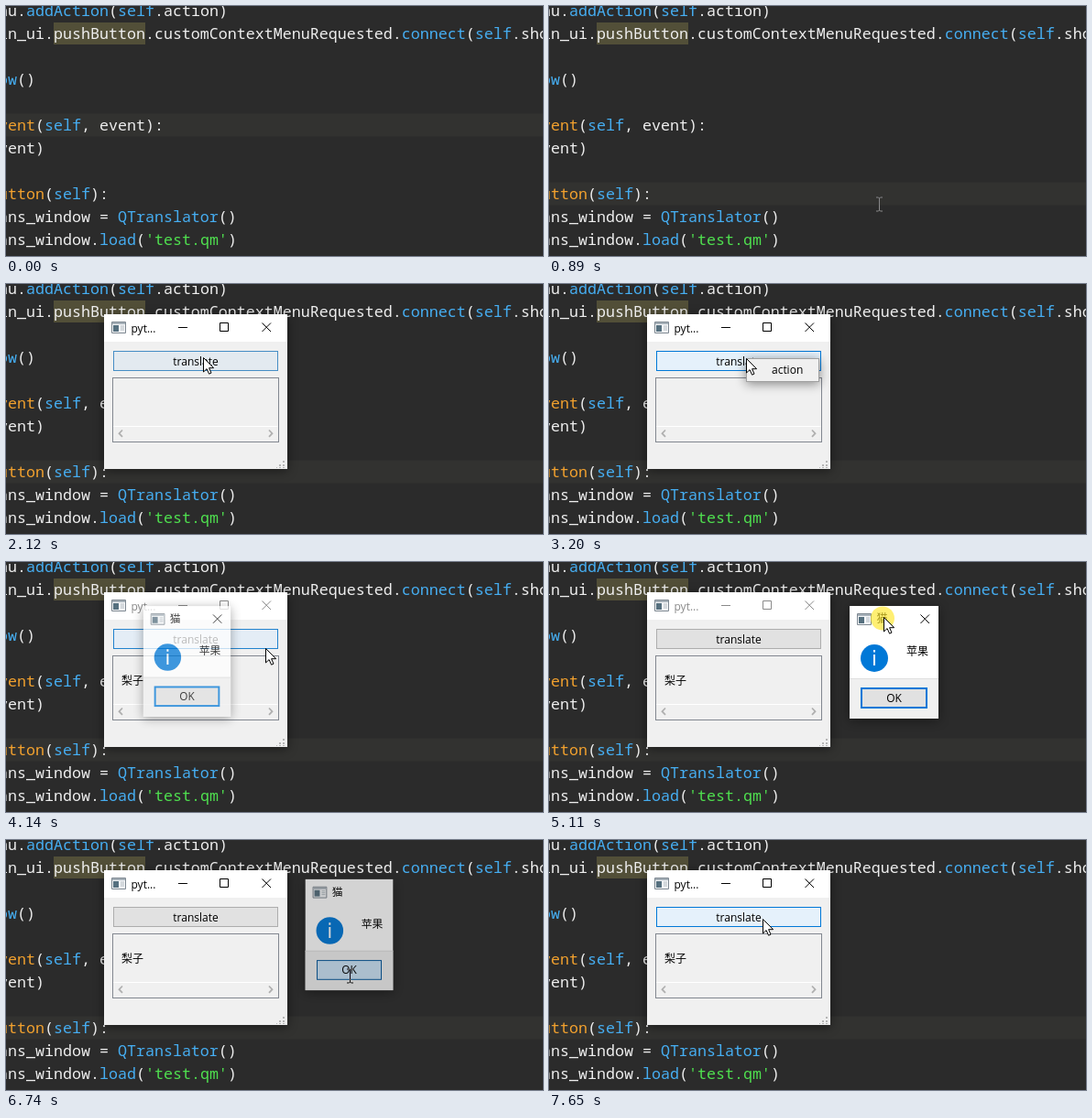
An HTML page for the animation above (8 s loop, 586 by 273 pixels).

```html
<!DOCTYPE html>
<html lang="en">
<head>
<meta charset="utf-8">
<style>
  html, body { margin: 0; width: 100%; height: 100%; overflow: hidden; background: #2b2b2b; }
  svg { display: block; width: 586px; height: 273px; }
  text { font: 12px "Open Sans", "Noto Sans CJK SC", "Noto Sans CJK", sans-serif; }
  #code text { font: 16.667px "Noto Sans Mono", monospace; white-space: pre; fill: #eee; }
  #code .b { fill: #46aef2; }
  #code .o { fill: #f2a12e; }
  #code .g { fill: #4fe04f; }
  .frame { filter: drop-shadow(0 2px 6px rgba(0, 0, 0, .45)); }
  .line { fill: none; stroke: currentColor; }
  #win, #dlg { transform-box: fill-box; transform-origin: center; }
</style>
</head>
<body>
<svg viewBox="0 0 586 273">
  <defs>
    <g id="icon">
      <path d="M.5.5h15v12H.5z" fill="#f4f6f8" stroke="#7d8790"/>
      <path d="M1 1h14v2H1z" fill="#a8b2ba"/>
      <path d="M2 4h6v7H2z" fill="#56707f"/>
      <path d="M10 5h4M10 7h4M10 9h4" stroke="#b4bcc2"/>
    </g>
  </defs>

  <rect id="band" width="586" height="25" fill="#323230"/>
  <rect x="52" y="18" width="100" height="24" fill="#524f38"/>
  <g id="code"></g>
  <path id="caret" d="M112 194v22" stroke="#ddd" stroke-width="2"/>

  <g id="win">
    <rect class="frame" x="107" y="33" width="200" height="169" fill="#f0f0f0"/>
    <path d="M107 33h200v30H107z" fill="#fff"/>
    <use href="#icon" x="115" y="41"/>
    <g id="bar">
      <text x="136.500" y="52.500" fill="currentColor">pyt...</text>
      <path class="line" d="M188 47.500h10M233.500 42.500h9v9h-9zM279.500 42.500l9.500 9.500m0-9.500l-9.500 9.500"/>
    </g>
    <rect x="117.500" y="73.500" width="179" height="21" fill="#e1e1e1" stroke="#adadad"/>
    <rect id="hover" x="117.500" y="73.500" width="179" height="21" fill="#e5f1fb" stroke="#0078d7"/>
    <text x="207" y="89" text-anchor="middle">translate</text>
    <rect x="116.500" y="102.500" width="181" height="70" fill="none" stroke="#828790"/>
    <path d="M117 155.500h180" stroke="#fff"/>
    <path d="M127 159.500l-3.500 3.700 3.500 3.700M287 159.500l3.500 3.700-3.500 3.700" fill="none" stroke="#b0b0b0" stroke-width="1.800"/>
    <text id="label" x="126" y="134">梨子</text>
    <path d="M302 193h2v2h-2zm0 4h2v2h-2zm-4 0h2v2h-2zm0 0M302 200h2v1h-2zm-4 0h2v1h-2zm-3 0h1v1h-1z" fill="#b5b5b5"/>
  </g>

  <g id="menu">
    <rect class="frame" x="215.500" y="81.500" width="79" height="25" fill="#f0f0f0" stroke="#a0a0a0"/>
    <rect id="item" x="218" y="84" width="74" height="20" fill="#91c9f7"/>
    <text x="243" y="98">action</text>
  </g>

  <g id="place">
    <g id="dlg">
      <rect class="frame" width="97" height="123" fill="#fff"/>
      <path d="M0 79h97v44H0z" fill="#f0f0f0"/>
      <path d="M0 79.500h97" stroke="#dfdfdf"/>
      <use href="#icon" x="8" y="8"/>
      <text x="29.500" y="18.500">猫</text>
      <path id="close" class="line" d="M77.500 9.500l9.500 9.500m0-9.500l-9.500 9.500"/>
      <circle cx="27" cy="57" r="15" fill="#0078d7"/>
      <path d="M26 53h2v12h-2zm0-5h2v2.500h-2z" fill="#fff"/>
      <text x="62" y="54">苹果</text>
      <rect id="ok" x="13" y="90" width="71" height="21"/>
      <text x="48.500" y="105" text-anchor="middle">OK</text>
    </g>
  </g>

  <circle id="press" r="13" fill="#ffe628" opacity=".65"/>
  <path id="arrow" d="M.5.500v15.500l3.600-3.400 2.500 5.600 2.400-1.100-2.400-5.400h5z" fill="#fff" stroke="#000"/>
  <path id="beam" d="M-3.500-7.500h2.500l1 1 1-1h2.500M0-6.500v13M-3.500 7.500h2.500l1-1 1 1h2.500" fill="none" stroke="#b8b8b8" style="mix-blend-mode:difference"/>
</svg>
<script>
const $ = id => document.getElementById(id);

// One code row per entry: baseline, left edge, then text with ~b ~o ~g colour runs closed by ~~.
const rows = [
  [11, -8, 'nu.~baddAction~~(~bself~~.action)'],
  [36, -8, 'in_ui.pushButton.customContextMenuRequested.~bconnect~~(~bself~~.show)'],
  [86, -8, '~bow~~()'],
  [136, -8, '~event~~'.replace('~event', '~ovent') + '(~bself~~, event):'],
  [161, -8, 'vent)'],
  [211, -8, '~outton~~(~bself~~):'],
  [236, -8, 'ans_window = ~bQTranslator~~()'],
  [261, -8, "ans_window.~bload~~(~g'test.qm'~~)"],
];
$('code').innerHTML = rows.map(([y, x, s]) =>
  `<text x="${x}" y="${y}">${s.replace(/~([bog])(.*?)~~/g, '<tspan class="$1">$2</tspan>')}</text>`).join('');

// Pointer path: time, x, y
const path = [
  [70, 384, 238], [280, 360, 216], [1630, 360, 216], [2120, 215, 80], [2460, 215, 80],
  [2530, 215, 81], [3200, 215, 81], [3540, 283, 94], [4210, 283, 94], [4700, 186, 59],
  [4830, 186, 59], [5110, 365, 60], [5380, 363, 54], [5580, 363, 54], [6070, 374, 147],
  [6670, 375, 148], [6860, 376, 149], [7370, 240, 92], [7510, 233, 86],
];
const presses = [[350, 490], [2660, 2870], [3940, 4070], [4830, 5440], [6600, 6700]];

const ramp = (t, a, b) => Math.min(1, Math.max(0, (t - a) / (b - a)));
const within = (t, a, b) => t >= a && t < b;
const show = (id, on) => $(id).style.visibility = on ? 'visible' : 'hidden';
const move = (id, x, y) => $(id).setAttribute('transform', `translate(${x} ${y})`);

function pointer(t) {
  const i = path.findIndex(p => p[0] > t);
  if (i < 1) return path[i ? path.length - 1 : 0].slice(1);
  const [a, ax, ay] = path[i - 1], [b, bx, by] = path[i];
  const u = ramp(t, a, b), k = u * u * (3 - 2 * u);
  return [ax + (bx - ax) * k, ay + (by - ay) * k];
}

// Windows open and close with a fade and a slight zoom.
function fade(id, a) {
  $(id).style.opacity = a;
  $(id).style.transform = `scale(${.93 + .07 * a})`;
}

function draw(t) {
  const [x, y] = pointer(t);
  $('band').setAttribute('y', t < 350 ? 117.5 : 192.5);
  show('caret', within(t, 350, 890));

  fade('win', ramp(t, 1400, 1580));
  $('bar').style.color = within(t, 4000, 6670) ? '#8a8a8a' : '#000';
  $('hover').style.opacity = ramp(t, 1980, 2220) - ramp(t, 4080, 4400) + ramp(t, 7400, 7600);
  show('label', t >= 4000);

  show('menu', within(t, 2730, 4000));
  show('item', within(t, 3270, 4000));

  const [dx, dy] = pointer(Math.min(5380, Math.max(4830, t)));
  move('place', dx - 37, dy - 12);
  fade('dlg', ramp(t, 4000, 4190) - ramp(t, 6700, 6900));
  show('close', t < 6670);
  const ok = t < 6000 ? ['#e1e1e1', '#0078d7', 2] : t < 6600 ? ['#e5f1fb', '#0078d7', 2] : ['#cce4f7', '#005499', 1];
  ['fill', 'stroke', 'stroke-width'].forEach((name, i) => $('ok').setAttribute(name, ok[i]));

  const arrow = t > 1420 && x < 307 || within(t, 4000, 6700);
  move('arrow', x, y);
  move('beam', Math.round(x) + .5, Math.round(y) + .5);
  move('press', x - 1, y + 1.5);
  show('arrow', arrow);
  show('beam', !arrow && t >= 70);
  show('press', presses.some(([a, b]) => within(t, a, b)));
}

const start = performance.now();
(function tick() {
  draw((performance.now() - start) % 8000);
  requestAnimationFrame(tick);
})();
</script>
</body>
</html>
```
